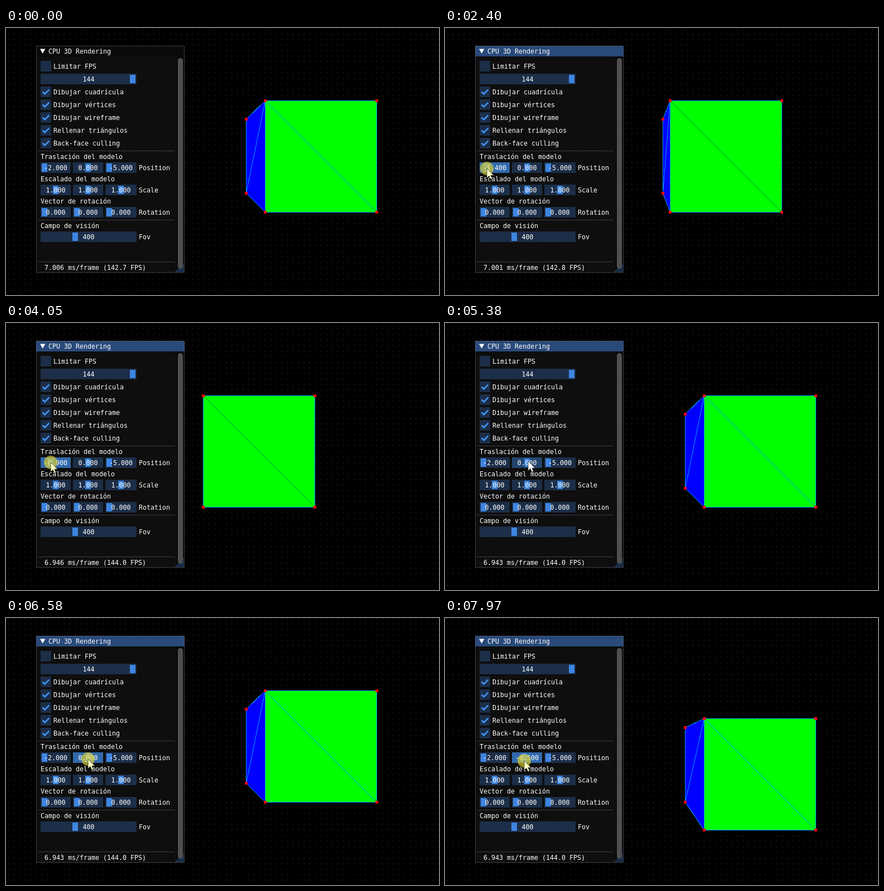
Animation, 776 px wide and 479 px high, one loop 8 s. Source, as an HTML page:

```html
<!DOCTYPE html>
<html lang="es">
<head>
<meta charset="utf-8">
<style>
html, body { margin: 0; width: 100%; height: 100%; overflow: hidden; background: #000; }
svg { display: block; width: 776px; height: 479px; }
text { font: 11.63px "DejaVu Sans Mono", monospace; fill: #fff; white-space: pre; }
.crisp { shape-rendering: crispEdges; }
.crisp path { stroke: #0096ff; }
</style>
</head>
<body>
<svg id="stage" viewBox="0 0 776 479"></svg>
<script>
const LOOP = 8000, STEP = 66.4;
const FRAME = "rgba(41,74,122,.54)", HOVER = "rgba(66,150,250,.4)", ACTIVE = "rgba(66,150,250,.67)";
const GRAB = "#3d85e0", GRAB_ACTIVE = "#4296fa", LINE = "rgba(110,110,128,.5)";
const stage = document.getElementById("stage");

function set(el, attrs) {
  for (const key in attrs) el.setAttribute(key, attrs[key]);
}
function add(tag, attrs, parent = stage) {
  const el = document.createElementNS("http://www.w3.org/2000/svg", tag);
  set(el, attrs);
  parent.append(el);
  return el;
}
const rect = (x, y, width, height, fill, more) =>
  add("rect", { x, y, width, height, fill, ...more });
function label(x, y, str, anchor = "start") {
  const el = add("text", { x, y: y + 4, "text-anchor": anchor });
  el.textContent = str;
  return el;
}
const separator = y => rect(58, y, 244, 1, LINE);

// Dotted background, one dashed line per row
for (let y = 0; y < 474; y += 10)
  add("path", { d: `M4 ${y + .5}H776`, stroke: "#4a4a4a", "stroke-dasharray": "1 9", "shape-rendering": "crispEdges" });

// Cube
const cube = add("g", { class: "crisp" });
const face = fill => add("path", { fill }, cube);
const leftFace = face("#00f"), topFace = face("#f0f"), frontFace = face("#0f0");
const diagonal = face("none");
const corners = Array.from({ length: 8 }, () => add("rect", { width: 5, height: 5, fill: "#f00" }, cube));

// Panel
rect(54, 32, 266, 407, "rgba(15,15,15,.94)");
const title = rect(54, 32, 266, 19, "#0a0a0a");
rect(54.5, 32.5, 265, 406, "none", { stroke: LINE });
add("path", { d: "M61 37.6H70.4L65.7 45.8Z", fill: "#fff" });
label(76, 42, "CPU 3D Rendering");
rect(306, 51, 13, 387, "rgba(5,5,5,.53)");
add("path", { d: "M319 421V438H302Z", fill: "rgba(66,150,250,.25)" });
rect(308, 54, 9, 378, "#4f4f4f", { rx: 4.5 });

function checkbox(y, name, checked) {
  rect(62, y - 10, 19, 19, FRAME);
  if (checked) add("path", { d: `M65.65 ${y - .5}l3.9 3.9l7.8 -7.8`, fill: "none", stroke: "#4296fa", "stroke-width": 2.6 });
  label(85, y, name);
}
function slider(x, y, w, grabX, str) {
  const box = rect(x, y - 10, w, 19, FRAME);
  const grab = rect(grabX, y - 8, 10, 15, GRAB);
  return { x, y, w, box, grab, text: label(x + w / 2, y, str, "middle") };
}
// Three sliders; each place runs from 0 to 1
function triple(y, heading, name, values, places) {
  label(62, y - 20, heading);
  label(238, y, name);
  return values.map((value, i) => {
    const x = 62 + 58 * i, w = i < 2 ? 54 : 56;
    return slider(x, y, w, x + 2 + places[i] * (w - 14), value);
  });
}

checkbox(69, "Limitar FPS", false);
slider(62, 92, 172, 222, "144");
["Dibujar cuadrícula", "Dibujar vértices", "Dibujar wireframe", "Rellenar triángulos", "Back-face culling"]
  .forEach((name, i) => checkbox(115 + 23 * i, name, true));
separator(220);
const [posX, posY] = triple(251, "Traslación del modelo", "Position", ["-2.000", "0.000", "-5.000"], [0, .5, 0]);
triple(291, "Escalado del modelo", "Scale", Array(3).fill("1.000"), [.5, .5, .5]);
triple(331, "Vector de rotación", "Rotation", Array(3).fill("0.000"), [0, 0, 0]);
separator(344);
label(62, 355, "Campo de visión");
slider(62, 375, 172, 119, "400");
label(238, 375, "Fov");
separator(419);
const status = label(69, 430, "");

// Pointer
const pointer = add("g", {});
const halo = add("circle", { r: 12, fill: "rgba(226,210,44,.66)" }, pointer);
const arrow = add("path", { d: "M0 0V17L4 13.3L6.8 19.5L9.6 18.3L6.9 12.3H12.3Z", stroke: "#222", "stroke-width": .7 }, pointer);

// Turning points of the pointer: time, x, y
const TURNS = [
  [0, 62, 505], [866, 33, 393],
  [1640, 68, 251], [2130, 70, 252], [2700, 82, 252], [3400, 63, 250], [4050, 80, 250], [4690, 65, 251],
  [5378, 149, 248], [5550, 148, 249], [6250, 137, 252], [6850, 154, 254], [7380, 133, 256], [7960, 142, 256]
];
const DRAG_X = { from: 1660, to: 4690, zero: 89 };
const DRAG_Y = { from: 5470, to: LOOP, zero: 147 };

function pointerAt(t) {
  const next = TURNS.findIndex(turn => turn[0] > t);
  if (next < 0) return TURNS.at(-1).slice(1);
  const [t0, x0, y0] = TURNS[next - 1], [t1, x1, y1] = TURNS[next];
  const u = (t - t0) / (t1 - t0), s = u * u * (3 - 2 * u);
  return [x0 + (x1 - x0) * s, y0 + (y1 - y0) * s].map(Math.round);
}

const dragging = (drag, t) => t >= drag.from && t < drag.to;
function dragValue(drag, t, initial) {
  if (t < drag.from) return initial;
  const [x] = pointerAt(Math.min(t, drag.to));
  return Math.max(-2, Math.min(2, (x - drag.zero) / 10));
}

function updateSlider(s, value, active, hover) {
  set(s.box, { fill: active ? ACTIVE : hover ? HOVER : FRAME });
  set(s.grab, { x: s.x + 22 + value * 10, fill: active ? GRAB_ACTIVE : GRAB });
  s.text.textContent = (value || 0).toFixed(3);
}
const inside = (s, x, y) => x >= s.x && x < s.x + s.w && y >= s.y - 10 && y < s.y + 9;

function drawCube(px, py) {
  // Single precision decides which way the corners round
  const qx = Math.fround(-px), qy = Math.fround(-py);
  const project = (x, y, z) => [
    364 + Math.floor((qx + x) * 400 / z),
    230 + Math.floor((qy + y) * 400 / z)
  ];
  const ring = z => [project(-1, -1, z), project(1, -1, z), project(1, 1, z), project(-1, 1, z)];
  const near = ring(4), far = ring(6);
  const line = pts => "M" + pts.map(([x, y]) => `${x + .5} ${y + .5}`).join("L");
  const quad = (...pts) => line(pts) + "Z";
  const left = qx > 1, top = qy > 1;

  set(leftFace, { d: left ? quad(far[0], near[0], near[3], far[3]) + line([near[0], far[3]]) : "" });
  set(topFace, { d: top ? quad(far[0], far[1], near[1], near[0]) + line([near[0], far[1]]) : "" });
  set(frontFace, { d: quad(...near) });

  const covered = qx < -px || qy < -py;
  set(diagonal, { d: line([near[0], near[2]]), style: covered ? "stroke: #009630" : "" });

  const shown = [true, true, true, true, left || top, top, false, left];
  [...near, ...far].forEach(([x, y], i) =>
    set(corners[i], { x: x - 2, y: y - 2, visibility: shown[i] ? "visible" : "hidden" }));
}

function draw(time) {
  const t = Math.floor(time / STEP + .05) * STEP;
  const [mx, my] = pointerAt(t);
  const onX = dragging(DRAG_X, t), onY = dragging(DRAG_Y, t), pressed = onX || onY;
  const px = dragValue(DRAG_X, t, -2), py = dragValue(DRAG_Y, t, 0);

  drawCube(px, py);
  updateSlider(posX, px, onX, !pressed && inside(posX, mx, my));
  updateSlider(posY, py, onY, !pressed && inside(posY, mx, my));
  set(title, { fill: t >= DRAG_X.from ? "#294a7a" : "#0a0a0a" });

  const ms = 6.943 + .063 / (1 + Math.exp((t - 3130) / 310));
  status.textContent = `${ms.toFixed(3)} ms/frame (${(1000 / ms).toFixed(1)} FPS)`;

  set(pointer, { transform: `translate(${mx} ${my})` });
  set(halo, { visibility: pressed ? "visible" : "hidden" });
  set(arrow, { fill: pressed ? "#ffffc0" : "#fff" });
}

const start = performance.now();
function tick() {
  draw((performance.now() - start) % LOOP);
  requestAnimationFrame(tick);
}
tick();
</script>
</body>
</html>
```
